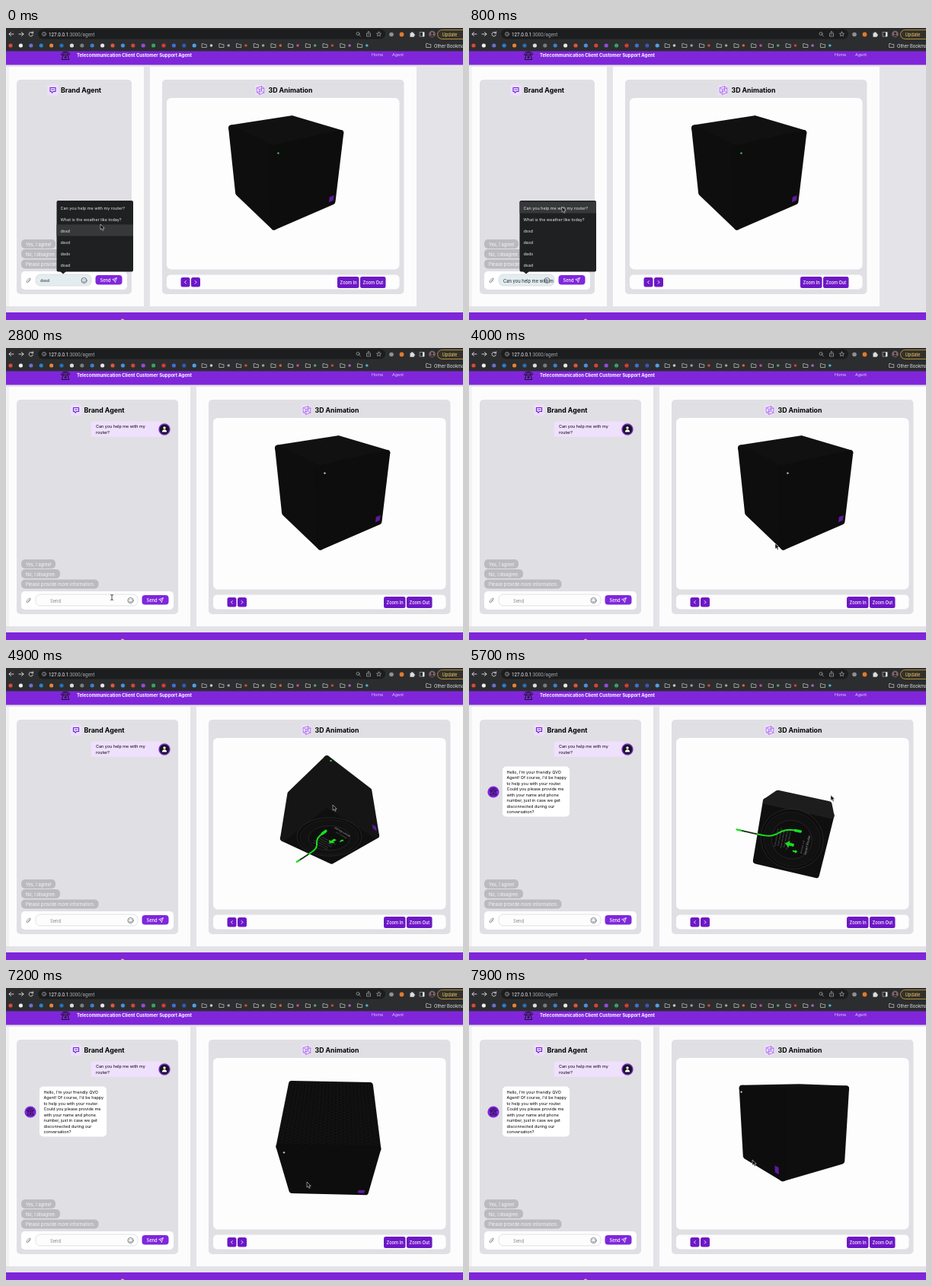
Animation of 600x384 px, one loop 8000 ms. Source, as an HTML page with a canvas:

```html
<!DOCTYPE html>
<html lang="en">
<head>
<meta charset="utf-8">
<title>Support agent</title>
<style>
html, body { margin: 0; width: 100%; height: 100%; overflow: hidden; }
#stage { position: relative; width: 600px; height: 384px; overflow: hidden; background: #e4e3e8; }
svg, canvas { position: absolute; left: 0; top: 0; }
canvas { left: 211px; top: 92px; border-radius: 6px; }
text { font: 5.8px Inter, sans-serif; dominant-baseline: central; }
.bold { font-weight: 700; }
.title { font-size: 8.75px; font-weight: 700; }
.button { font-size: 5.7px; font-weight: 500; }
.nav text { font-size: 5.4px; }
.msg, .msg text { font-size: 5.45px; }
.url { font: 6.3px Roboto, sans-serif; }
.line { fill: none; stroke-linecap: round; stroke-linejoin: round; }

.shift, .half, .grow, .after, .reply, .menu, .hover, .field,
.first, .second, .third, .beam, .arrow { animation: 8s step-end infinite; }
.shift { animation-name: shift; }
.half { animation-name: half; }
.grow, .field { width: calc(var(--w) * 1px); animation-name: grow; }
.after { animation-name: after; }
.reply { animation-name: reply; }
.menu { animation-name: menu; }
.hover { animation-name: hover; }
.field { animation-name: grow, field; }
.first { animation-name: first; }
.second { animation-name: second; }
.third { animation-name: third; }
.beam { animation-name: beam; }
.arrow { animation-name: arrow; }
#cursor { animation: move 8s linear infinite; }

@keyframes shift { 0% { transform: none } 25%, 100% { transform: translate(61px) } }
@keyframes half { 0% { transform: none } 25%, 100% { transform: translate(30.5px) } }
@keyframes grow { 0% { width: calc(var(--w) * 1px) } 25%, 100% { width: calc(var(--w) * 1px + 61px) } }
@keyframes after { 0% { opacity: 0 } 25%, 100% { opacity: 1 } }
@keyframes reply { 0% { opacity: 0 } 66.25%, 100% { opacity: 1 } }
@keyframes menu { 0% { opacity: 1 } 13.75%, 100% { opacity: 0 } }
@keyframes hover { 0% { transform: none } 5.5% { transform: translateY(-15px) } 8%, 100% { transform: translateY(-30px) } }
@keyframes field { 0% { fill: #e3edf0 } 13.75% { fill: #e4e5ee } 25%, 100% { fill: #fdfdfd } }
@keyframes first { 0% { opacity: 1 } 5.5%, 100% { opacity: 0 } }
@keyframes second { 0% { opacity: 0 } 5.5% { opacity: 1 } 8%, 100% { opacity: 0 } }
@keyframes third { 0% { opacity: 0 } 8% { opacity: 1 } 25%, 100% { opacity: 0 } }
@keyframes beam { 0% { opacity: 0 } 27% { opacity: 1 } 39%, 100% { opacity: 0 } }
@keyframes arrow { 0% { opacity: 1 } 27% { opacity: 0 } 39%, 100% { opacity: 1 } }
@keyframes move {
  0%, 3.75% { transform: translate(124px, 258px) }
  8.75%, 13.75% { transform: translate(122px, 235px) }
  20%, 25% { transform: translate(139px, 338px) }
  31.25%, 37.5% { transform: translate(139px, 328px) }
  51.25%, 53.75% { transform: translate(428px, 250px) }
  61.25% { transform: translate(429px, 180px) }
  71.25% { transform: translate(475px, 167px) }
  81.25% { transform: translate(418px, 284px) }
  98.75%, 100% { transform: translate(372px, 226px) }
}
</style>
</head>
<body>
<div id="stage">
<svg width="600" height="384">
  <defs>
    <clipPath id="typed"><rect x="40" y="324" width="71" height="16"/></clipPath>
  </defs>

  <!-- browser bar -->
  <rect width="600" height="31" fill="#2c2d2f"/>
  <rect x="42" y="1.500" width="456" height="13" rx="6.500" fill="#1c1d1f"/>
  <g class="line" stroke="#e4e4e6" stroke-width=".9">
    <path d="M10 8H4m2.500-2.500L4 8l2.500 2.500M17 8h6m-2.500-2.500L23 8l-2.500 2.500"/>
    <path d="M35 6.500a2.700 2.700 0 1 0 .4 2.500M35.600 4.800v2h-2"/>
    <g stroke-width=".6" stroke="#c4c5c8">
      <circle cx="50" cy="8" r="2.500"/><path d="M50 8v1.300M50 6.700v.1"/>
      <circle cx="462" cy="7.500" r="2"/><path d="M463.500 9l2 2"/>
      <path d="M474.500 7h-1v4h5V7h-1M476 9V4.500l-1.300 1.300M476 4.500l1.300 1.300"/>
      <path d="M489.500 5l.9 2 2.100.2-1.600 1.400.5 2.100-1.900-1.100-1.900 1.100.5-2.100-1.600-1.400 2.100-.2z"/>
      <rect x="543.500" y="5.500" width="5.500" height="5.500"/>
    </g>
  </g>
  <circle cx="506" cy="8.500" r="2.800" fill="#8e9195"/>
  <circle cx="519.500" cy="8.500" r="2.900" fill="#e07a2d"/>
  <path d="M530.500 6.500h1.500a1.200 1.200 0 0 1 2.400 0h1.300v1.500a1.200 1.200 0 0 1 0 2.400v1.300h-5.200z" fill="#dcdde0"/>
  <rect x="547" y="5.500" width="2.300" height="5.800" fill="#e4e4e6"/>
  <circle cx="559.500" cy="8" r="4.300" fill="#7d6469"/>
  <circle cx="559.500" cy="7" r="1.600" fill="#2e2226"/><path d="M556.700 11.300a2.900 2.900 0 0 1 5.600 0z" fill="#2e2226"/>
  <rect x="566.500" y="2.500" width="44" height="12" rx="6" fill="#35312a" stroke="#d2a63a" stroke-width=".8"/>
  <text x="572.500" y="8.500" fill="#f0cd6c">Update</text>
  <text class="url" x="56" y="8.500" fill="#f1f1f2">127.0.0.1<tspan fill="#a5a7ab">:3000/agent</tspan></text>
  <g id="marks"></g>
  <path d="M552 20.500h2l.8 1h3v4h-5.800z" class="line" stroke="#ccc" stroke-width=".7"/>
  <text x="562" y="23" fill="#e4e4e6">Other Bookmarks</text>

  <!-- header and footer -->
  <rect y="30.500" width="600" height="18" fill="#7f26da"/>
  <rect y="374" width="600" height="10" fill="#7f26da"/>
  <circle cx="153" cy="385" r="2.500" fill="#e5b9a4"/>
  <g class="line" stroke="#17121f" stroke-width="1">
    <path d="M72.500 35c0-5 11-5 11 0h-2.500l-1-2h-4l-1 2zM75 36l-1.800 5.500h9.600L81 36z"/>
    <circle cx="78" cy="38.500" r="1.200"/>
  </g>
  <text class="bold" x="93" y="35" fill="#fff" style="font-size:6px">Telecommunication Client Customer Support Agent</text>
  <g class="nav" fill="#ddc9f5">
    <text x="480" y="35">Home</text>
    <text x="507" y="35">Agent</text>
  </g>

  <!-- chat -->
  <rect class="grow" style="--w:181" y="51" height="315" fill="#fcfcfc"/>
  <rect width="4" y="51" height="315" fill="#000" opacity=".035"/>
  <rect class="grow" style="--w:151" x="14" y="68" height="282" rx="5" fill="#e0dfe4"/>
  <g class="half">
    <rect x="54" y="74" width="15" height="15" rx="3" fill="#ecdffb"/>
    <path class="line" d="M58 78.500h7v5h-3l-1.500 1.700-1-1.700H58z" stroke="#6d1fd0" stroke-width="1.100"/>
    <path class="line" d="M60 81h3" stroke="#6d1fd0" stroke-width=".9"/>
    <text class="title" x="72" y="81.500">Brand Agent</text>
  </g>
  <g fill="#bbbabf">
    <rect x="20" y="278" width="45" height="12" rx="5"/>
    <rect x="20" y="291" width="51" height="12" rx="5"/>
    <rect x="20" y="304.500" width="101.500" height="12" rx="5"/>
  </g>
  <g fill="#f6f6f8">
    <text x="26" y="284">Yes, I agree!</text>
    <text x="26" y="297">No, I disagree.</text>
    <text x="26" y="310.500">Please provide more information.</text>
  </g>
  <rect class="grow" style="--w:139" x="20" y="320" height="24" rx="5" fill="#fff"/>
  <path class="line" d="M32 331l-2.700 3.200c-1.500 1.500-3.300 0-2-1.500l3-3.400c1-1 2.300.1 1.400 1.200l-2.600 2.900" stroke="#77787c" stroke-width=".8"/>
  <rect class="field" style="--w:73" x="39" y="324" height="15" rx="6" stroke="#d3d3da" stroke-width=".7"/>
  <g clip-path="url(#typed)" fill="#20242b">
    <text class="first" x="45" y="332" style="font-size:5.300px">dssd</text>
    <text class="second" x="45" y="332">What is the weather like today?</text>
    <text class="third" x="45" y="332">Can you help me with my router?</text>
  </g>
  <text class="after" x="58" y="332" fill="#85868c">Send</text>
  <g class="shift">
    <g class="line" stroke="#4c4f58" stroke-width=".7">
      <circle cx="102.500" cy="332" r="3.600"/><path d="M100.700 333c.8 1.500 2.800 1.500 3.600 0M101.200 330.800v.2M103.800 330.800v.2"/>
    </g>
    <rect x="117.500" y="325" width="35" height="12.500" rx="4" fill="#8026dc"/>
    <text class="button" x="123.500" y="331.300" fill="#fff">Send</text>
    <path class="line" d="M145 328.700l-5.300 2 2.400 1.100 1.100 2.400zl-2.900 3.100" stroke="#fff" stroke-width=".7"/>
  </g>
  <g class="after msg">
    <rect x="111.500" y="96.500" width="93" height="20.500" rx="4" fill="#efe0fd"/>
    <text x="118" y="103">Can you help me with my</text>
    <text x="118" y="110.700">router?</text>
    <circle cx="208" cy="107" r="7" fill="#17131f" stroke="#7a27d2" stroke-width="1.300"/>
    <circle cx="208" cy="105" r="1.700" fill="#fff"/><path d="M204.800 110.500c0-4.500 6.400-4.500 6.400 0z" fill="#fff"/>
  </g>
  <g class="reply msg">
    <rect x="44" y="129.500" width="88" height="66" rx="5" fill="#fff"/>
    <g id="answer"></g>
    <circle cx="32" cy="163" r="7.600" fill="#7d25d8"/>
    <g class="line" stroke="#1d0c33" stroke-width=".9">
      <path d="M27.500 161.500c0-4.500 9-4.500 9 0h-2l-.8-1.500h-3.400l-.8 1.500zM29.500 162.500l-1.500 4.500h8l-1.500-4.500z"/>
      <circle cx="32" cy="164.700" r=".9"/>
    </g>
  </g>

  <!-- viewer -->
  <g class="shift">
    <rect x="189" y="51" width="350" height="315" fill="#fcfcfc"/>
    <rect x="205" y="68" width="317.500" height="282" rx="5" fill="#e0dfe4"/>
    <rect x="211" y="92" width="305.500" height="225.500" rx="6" fill="#fdfdfd"/>
    <rect x="211" y="324.500" width="305.500" height="19" rx="5" fill="#fdfdfd"/>
    <rect x="327" y="75" width="13" height="13" rx="2" fill="#ecdffb"/>
    <path class="line" d="M329.500 78.500l6-1.800 3.300 2.300v6.300l-6 2-3.300-2.600zl3.300 2.300 6-1.800M332.800 80.800v6.500M335.500 76.700v6l3.300 2.600M335.500 82.700l-6 2" stroke="#9b55e6" stroke-width=".7"/>
    <text class="title" x="344.500" y="81.500">3D Animation</text>
    <g fill="#6d18c6">
      <rect x="229.500" y="328" width="12" height="12.500" rx="2.500"/><rect x="243" y="328" width="12" height="12.500" rx="2.500"/>
      <rect x="435" y="327" width="28.500" height="15" rx="2.500"/><rect x="465" y="327" width="33.500" height="15" rx="2.500"/>
    </g>
    <path class="line" d="M236.300 332.500l-1.800 1.800 1.800 1.800M248.200 332.500l1.800 1.800-1.800 1.800" stroke="#fff" stroke-width=".9"/>
    <g fill="#fff">
      <text class="button" x="438.500" y="334.500">Zoom In</text>
      <text class="button" x="468.500" y="334.500">Zoom Out</text>
    </g>
  </g>
</svg>

<canvas class="shift" id="view" width="305" height="225"></canvas>

<svg width="600" height="384">
  <g class="menu">
    <rect x="66.500" y="227" width="100.500" height="93.500" rx="2" fill="#1f2022"/>
    <path d="M71 320h8l-4 3.500z" fill="#1f2022"/>
    <rect class="hover" x="66.500" y="258.500" width="100.500" height="15" fill="#37383a"/>
    <g id="options" class="msg" fill="#e6e6e8"></g>
  </g>
  <g id="cursor">
    <path class="arrow" d="M0 0v7.200l1.700-1.500 1.200 2.700 1.300-.6-1.200-2.600h2.300z" fill="#0a0a0a" stroke="#fff" stroke-width=".5"/>
    <path class="beam line" d="M-1.500-3.500q1.500 0 1.500 1v5q0 1-1.500 1M1.500-3.500Q0-3.500 0-2.500M0 2.500q0 1 1.500 1" stroke="#222" stroke-width=".8"/>
  </g>
</svg>
</div>

<script>
const $ = id => document.getElementById(id);
const rows = (lines, x, y, step) =>
  lines.map((s, i) => `<text x="${x}" y="${y + i * step}">${s}</text>`).join('');

$('options').innerHTML = rows(['Can you help me with my router?', 'What is the weather like today?',
  'dssd', 'dasd', 'dads', 'dsad'], 71.5, 236.5, 15);
$('answer').innerHTML = rows(["Hello, I'm your friendly QVO", "Agent! Of course, I'd be happy",
  'to help you with your router.', 'Could you please provide me', 'with your name and phone',
  'number, just in case we get', 'disconnected during our', 'conversation?'], 49.5, 136.5, 7.55);

const marks = ('#d9483b #eee #6a6fd0 #2a7fd4 #e8823a #2a6fb8 #ddd #777c84 #3d7fd0 #e8e8ea ' +
  '#e0573a #4a90e0 #d8433a #8a4fd8 #39a06a #d63a3a #3f6fd8 #3558b8 #4fa0e8').split(' ');
const tags = '#ccc #8fa3b0 #d04a3a #b09a80 #e0602f #c84a9a #58a060 #d04040 #b060c8 #48b0c8'.split(' ');
$('marks').innerHTML =
  marks.map((c, i) => `<circle cx="${6 + i * 13.4}" cy="23" r="2.6" fill="${c}"/>`).join('') +
  tags.map((c, i) => {
    const x = 257.5 + i * 22.7;
    return `<path class="line" d="M${x} 20.700h2l.8 1h3v3.800h-5.800z" stroke="#ccc" stroke-width=".7"/>
      <circle cx="${x + 12}" cy="23" r="1.800" fill="${c}"/>`;
  }).join('');

// Box poses: time, centre, down axis, side axis (camera space, y down, z away)
const start = [[2, -32, 423], [0, .883, .469], [.819, -.269, .506]];
const end = [[0, -35, 430], [0, .964, .267], [.588, .216, -.78]];
const poses = [
  [0, ...start],
  [4300, ...start],
  [4900, [0, -24, 508], [0, .766, -.643], [.743, .43, .512]],
  [5700, [7, 16, 540], [-.12, .25, -.96], [-.2, .98, .28]],
  [6100, [3, 14, 460], [-.44, .9, 0], [0, 0, 1]],
  [6500, [1, 21, 376], [0, 0, 1], [.642, -.767, 0]],
  [7900, ...end],
  [8000, ...end]
];
const HALF = 72, FOCAL = 300, GREEN = '#16e01c';
const ctx = $('view').getContext('2d');

const dot = (a, b) => a[0] * b[0] + a[1] * b[1] + a[2] * b[2];
const unit = a => a.map(n => n / Math.hypot(...a));
const cross = (a, b) => [a[1] * b[2] - a[2] * b[1], a[2] * b[0] - a[0] * b[2], a[0] * b[1] - a[1] * b[0]];
const mix = (a, b, k) => a.map((n, i) => n + (b[i] - n) * k);

function poseAt(t) {
  const i = Math.max(1, poses.findIndex(k => k[0] > t));
  const [t0, c0, s0, q0] = poses[i - 1], [t1, c1, s1, q1] = poses[i];
  const k = (t - t0) / (t1 - t0);
  const s = unit(mix(s0, s1, k)), raw = mix(q0, q1, k), d = dot(raw, s);
  const q = unit(raw.map((n, j) => n - d * s[j]));
  return { c: mix(c0, c1, k), axes: [cross(q, s), q, s] };
}

function trace(pts, close = true) {
  ctx.beginPath();
  pts.forEach(p => ctx.lineTo(...p));
  if (close) ctx.closePath();
}

function shape(pts, fill, stroke, width = .8) {
  trace(pts);
  ctx.fillStyle = fill;
  ctx.fill();
  if (stroke) {
    ctx.strokeStyle = stroke;
    ctx.lineWidth = width;
    ctx.stroke();
  }
}

function base(at) {
  const P = (u, v) => at(u, v, 1);
  const ring = r => Array.from({ length: 48 }, (_, i) => P(r * Math.cos(i * Math.PI / 24), r * Math.sin(i * Math.PI / 24)));
  shape(ring(.9), '#0c0c0c', '#2b2b2b');
  shape(ring(.82), '#111', '#202020');
  shape(ring(.58), '#0e0e0e', '#2a2a2a');

  const label = (s, u, v, size, color) => {
    const o = P(u, v), a = P(u, v - .1), b = P(u - .1, v);
    ctx.save();
    ctx.transform(a[0] - o[0], a[1] - o[1], b[0] - o[0], b[1] - o[1], ...o);
    ctx.scale(size, size);
    ctx.font = '1px Inter, sans-serif';
    ctx.fillStyle = color;
    ctx.fillText(s, 0, 0);
    ctx.restore();
  };
  label('Smart Router', -.5, .35, 1, '#aaa');
  label('Wireless unit', -.37, .35, .7, '#777');
  for (let i = 0; i < 5; i++) label('Power and data port', .42 - i * .09, .32 - i % 2 * .05, .6, '#777');

  const arrow = (u, v, k) => shape([[.16, 0], [.02, -.12], [.02, -.05], [-.13, -.05], [-.13, .05], [.02, .05], [.02, .12]]
    .map(([x, y]) => P(u + x * k, v + y * k)), GREEN);
  arrow(.02, .14, .9);
  arrow(-.16, .32, -.5);

  const cable = (from, to, color, width) => {
    const pts = [];
    for (let i = 0; i <= 20; i++) {
      const u = from + (to - from) * i / 20;
      pts.push(P(u, .06 - .37 / (1 + Math.exp((u - .4) * 9))));
    }
    trace(pts, false);
    ctx.strokeStyle = color;
    ctx.lineWidth = width;
    ctx.stroke();
  };
  cable(.9, 1.55, '#10300f', 1.8);
  cable(-.12, 1, GREEN, 2);
  cable(-.2, -.05, GREEN, 3.6);
  cable(1.5, 1.63, GREEN, 2.4);
}

function draw(t) {
  const { c, axes } = poseAt(t);
  const at = (...k) => {
    const [x, y, z] = c.map((n, i) => n + HALF * (k[0] * axes[0][i] + k[1] * axes[1][i] + k[2] * axes[2][i]));
    return [152.5 + FOCAL * x / z, 112.5 + FOCAL * y / z];
  };
  const seen = (axis, sign) => sign * dot(axes[axis], c) + HALF < 0;
  ctx.clearRect(0, 0, 305, 225);
  ctx.lineJoin = ctx.lineCap = 'round';

  // Inset faces with a thick round stroke give the rounded corners
  for (const axis of [2, 1, 0]) for (const sign of [-1, 1]) {
    if (!seen(axis, sign)) continue;
    const quad = [[-1, -1], [1, -1], [1, 1], [-1, 1]].map(([a, b]) => {
      const k = [];
      k[axis] = sign * .93;
      k[(axis + 1) % 3] = a * .93;
      k[(axis + 2) % 3] = b * .93;
      return at(...k);
    });
    const lit = Math.max(0, -sign * axes[axis][1]);
    const g = Math.round(13 + axis + lit * (axis === 2 ? 2 : 16));
    shape(quad, `rgb(${g},${g},${g})`, `rgb(${g},${g},${g})`, 8);
  }

  if (axes[2][2] > .6 && seen(2, -1)) {
    for (let i = 0; i < 24; i++) for (let j = 0; j < 24; j++) {
      const p = at(-.92 + (i + j % 2 / 2) * .078, -.92 + j * .08, -1);
      ctx.fillStyle = '#050505';
      ctx.fillRect(p[0], p[1], 1.3, 1.3);
      ctx.fillStyle = '#202020';
      ctx.fillRect(p[0] + 1, p[1] + 1, .9, .9);
    }
  }
  if (seen(0, -1)) {
    const [x, y] = at(-1, -.84, -.84);
    ctx.beginPath();
    ctx.arc(x, y, 1.2, 0, 7);
    ctx.fillStyle = t < 2000 || (t > 4300 && t < 5200) ? '#3fd85a' : '#b9cfcb';
    ctx.fill();
    const r = .08;
    shape([[-r, -r], [r, -r], [r, r], [-r, r]].map(([a, b]) => at(-1, .8 + a, .76 + b)), '#5c1b9c');
  }
  if (seen(2, 1)) base(at);
}

let t0;
function frame(now) {
  t0 ??= now;
  draw((now - t0) % 8000);
  requestAnimationFrame(frame);
}
requestAnimationFrame(frame);
</script>
</body>
</html>
```
